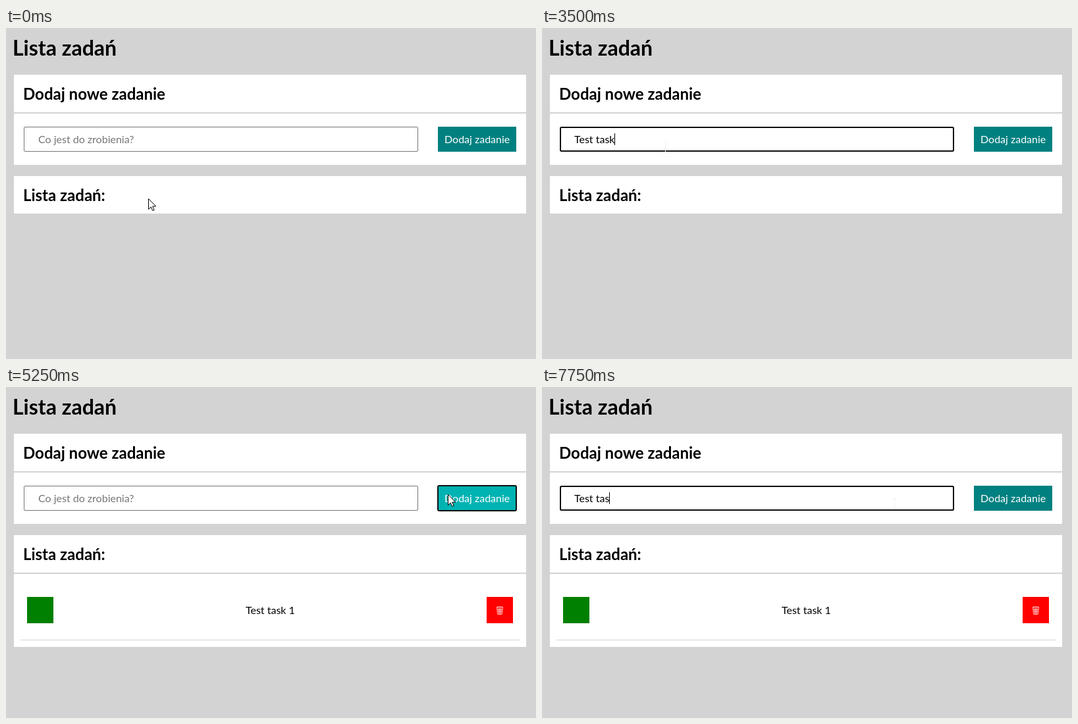
These frames come from a looping animation (805x503 px, 8000 ms). An HTML page:

```html
<!DOCTYPE html>
<html lang="pl">
<head>
<meta charset="utf-8">
<title>Lista zadań</title>
<style>
  html, body { margin: 0; width: 100%; height: 100%; overflow: hidden; background: #d3d3d3; }
  svg { display: block; width: 805px; height: 503px; }
  text { font: 16px Lato, sans-serif; white-space: pre; }
  .title { font-size: 32px; font-weight: 700; }
  .heading { font-size: 24px; font-weight: 700; }
  .card { fill: #fff; }
  .hint { fill: #757575; }
  .label { fill: #fff; }
  .ring { fill: none; stroke: #101010; stroke-width: 2; }
  .arrow { fill: #fff; stroke: #000; }
  .beam { fill: none; stroke: #f1f1f1; }
  .bin { fill: none; stroke: #fff; stroke-width: .8; opacity: .9; }
</style>
</head>
<body>
<svg viewBox="0 0 805 503">
  <text class="title" x="10" y="42">Lista zadań</text>

  <rect class="card" x="12" y="71" width="778" height="57"/>
  <rect class="card" x="12" y="130" width="778" height="78"/>
  <text class="heading" x="26" y="109">Dodaj nowe zadanie</text>

  <rect x="27.5" y="150.5" width="598" height="37" rx="1.5" fill="#fff" stroke="#767676"/>
  <rect id="inputRing" class="ring" x="28" y="151" width="597" height="36" rx="2"/>
  <text id="hint" class="hint" x="49" y="175">Co jest do zrobienia?</text>
  <text id="typed" x="49" y="175"></text>
  <rect id="caret" y="160" width="1" height="18"/>

  <rect id="button" x="656" y="150" width="119" height="38"/>
  <rect id="buttonRing" class="ring" x="656" y="150" width="119" height="38" rx="2"/>
  <text class="label" x="666" y="175">Dodaj zadanie</text>

  <rect class="card" x="12" y="225" width="778" height="57"/>
  <text class="heading" x="26" y="263">Lista zadań:</text>

  <g id="task">
    <rect class="card" x="12" y="284" width="778" height="111"/>
    <rect x="32" y="319" width="40" height="40" fill="#008000"/>
    <text x="364" y="345">Test task 1</text>
    <rect x="730" y="319" width="40" height="40" fill="#f00"/>
    <path class="bin" d="M745.5 334.5q4.5-2 9 0q-4.5 2-9 0l1 10.5q3.5 1.5 7 0l1-10.5M748 336.5l.5 8.5M750 336.5v9M752 336.5l-.5 8.5M746 338h8M746.500 341h7"/>
    <rect x="22" y="384" width="758" height="1" fill="#d3d3d3"/>
  </g>

  <path id="arrow" class="arrow" d="M.5.5v16l3.700-3.600 2.500 5.600 2.400-1-2.400-5.500h5z"/>
  <path id="beam" class="beam" d="M-3 .5h3l.5.5.5-.5h3M.5 1v15M-3 16.500h3l.5-.5.5.5h3"/>
</svg>
<script>
  const LOOP = 8000, STEP = 250;
  const el = id => document.getElementById(id);
  const show = (id, on) => el(id).style.display = on ? '' : 'none';

  // Each track lists [start time, value]; a value holds until the next entry.
  const at = (track, t) => track.findLast(([start]) => start <= t)[1];

  // Number of letters of the task name typed so far.
  const typing = [
    [0, 0], [2000, 1], [2250, 2], [2500, 3], [2750, 4], [3000, 5],
    [3250, 7], [3500, 9], [3750, 10], [4000, 11], [5250, 0],
    [6500, 1], [6750, 2], [7000, 3], [7250, 4], [7500, 5], [7750, 8]
  ];
  const caret = [
    [0, false], [750, true], [1250, false], [2000, true], [4500, false],
    [5000, true], [5250, false], [5750, true], [6250, false], [6500, true]
  ];
  const focus = [[0, ''], [750, 'input'], [5250, 'button'], [5750, 'input']];
  const pointer = [
    [0, ['arrow', 216, 259]], [250, ['arrow', 198, 213]], [500, ['beam', 187, 173]],
    [4500, ['beam', 420, 171]], [4750, ['arrow', 690, 169]], [5000, ['arrow', 695, 168]],
    [5250, ['arrow', 671, 163]], [5500, ['beam', 585, 167]], [5750, ['beam', 535, 169]]
  ];

  function draw(t) {
    const count = at(typing, t), focused = at(focus, t);
    const typed = el('typed');
    typed.textContent = 'Test task 1'.slice(0, count);
    show('hint', !count);
    show('caret', at(caret, t));
    el('caret').setAttribute('x', Math.round(49 + (count ? typed.getComputedTextLength() : 0)));

    show('inputRing', focused === 'input');
    show('buttonRing', focused === 'button');
    show('task', t >= 5250);

    const [shape, x, y] = at(pointer, t);
    for (const id of ['arrow', 'beam']) show(id, id === shape);
    el(shape).setAttribute('transform', `translate(${x} ${y})`);
    el('button').setAttribute('fill', shape === 'arrow' && x >= 656 ? '#00b3b3' : '#008080');
  }

  let last = -1;
  function tick() {
    const t = Math.floor(performance.now() % LOOP / STEP) * STEP;
    if (t !== last) draw(last = t);
    requestAnimationFrame(tick);
  }
  tick();
</script>
</body>
</html>
```
